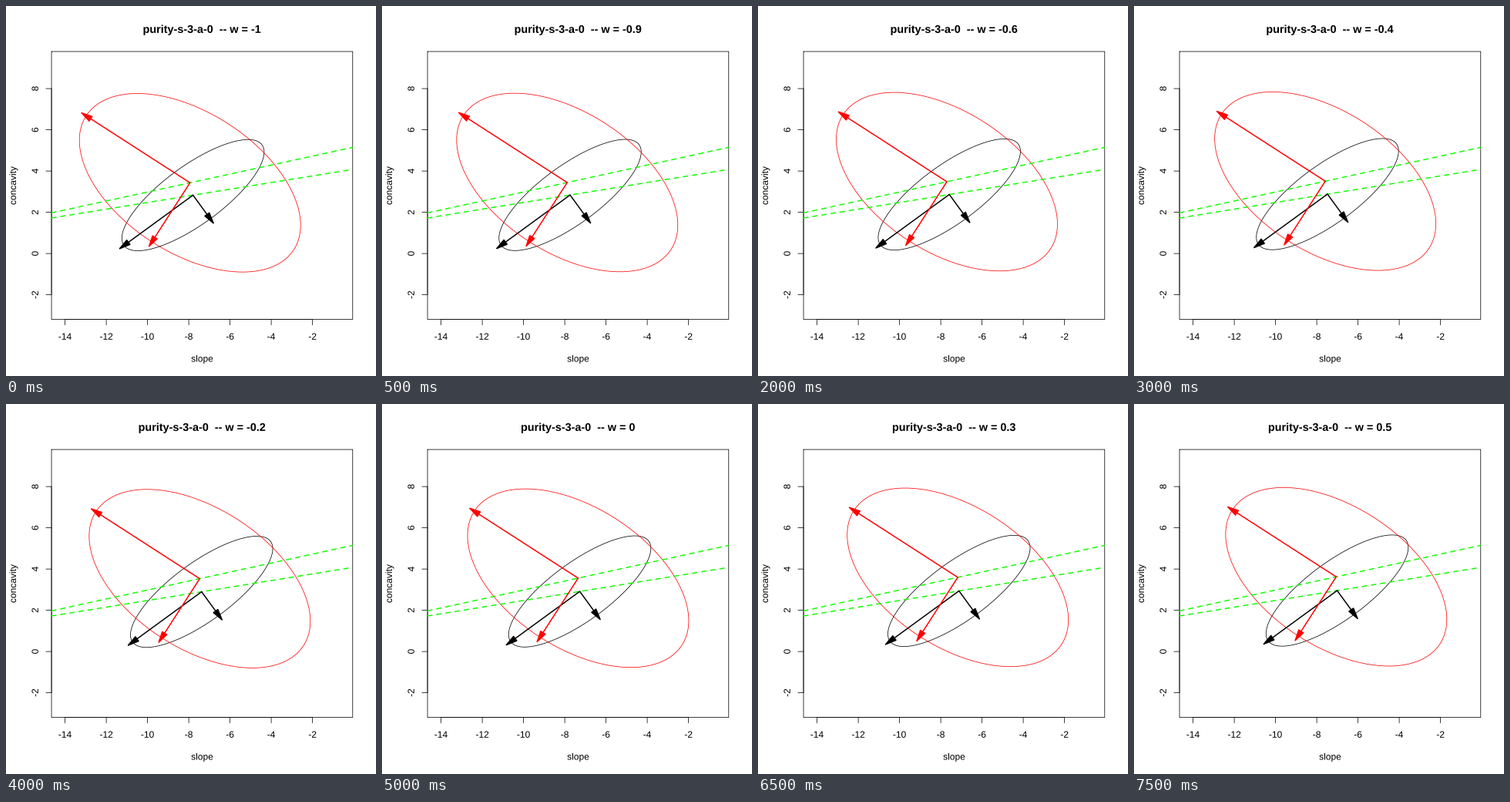
A matplotlib script that plays this animation: 480 px wide and 480 px high, repeating every 8 s.

```python
import numpy as np
import matplotlib.pyplot as plt
from matplotlib.animation import FuncAnimation
from matplotlib.patches import PathPatch, Polygon
from matplotlib.textpath import TextPath
from matplotlib.transforms import Affine2D

SIZE, DPI = 480, 72          # one point equals one pixel
STEPS, INTERVAL = 16, 500
LEFT, RIGHT, TOP, BOTTOM = 59.04, 449.76, 59.04, 406.56
UNIT, TICK = 26.75, 7.2
THIN, THICK = 0.75, 1.5
HEAD_LENGTH, HEAD_WIDTH = 14.1, 7.05

fig = plt.figure(figsize=(SIZE / DPI, SIZE / DPI), dpi=DPI, facecolor="white")
ax = fig.add_axes([0, 0, 1, 1])
ax.set_xlim(0, SIZE)
ax.set_ylim(SIZE, 0)
ax.axis("off")


def line(xs, ys, color="black", lw=THIN, **kw):
    kw = {"solid_capstyle": "round", "solid_joinstyle": "round", **kw}
    return ax.plot(xs, ys, color=color, lw=lw, snap=False, **kw)[0]


def text_shape(text, x, y, size=12, turn=0, weight="normal"):
    """Outline of a line of text, centred on x (or y if turned)."""
    font = {"family": "Liberation Sans", "weight": weight}
    path = TextPath((0, 0), text, size=size, prop=font)
    box = path.get_extents()
    place = (Affine2D().translate(-(box.x0 + box.x1) / 2, 0).scale(1, -1)
             .rotate_deg(-turn).translate(x, y))
    return place.transform_path(path)


def label(text, x, y, **kw):
    return ax.add_patch(PathPatch(text_shape(text, x, y, **kw), fc="black",
                                  lw=0, snap=False))


def draw_axes():
    line([LEFT, RIGHT, RIGHT, LEFT, LEFT], [TOP, TOP, BOTTOM, BOTTOM, TOP])
    xs = {s: 76.6 + UNIT * (s + 14) for s in range(-14, 0, 2)}
    ys = {c: 321.1 - UNIT * c for c in range(-2, 10, 2)}
    line([xs[-14], xs[-2]], [BOTTOM, BOTTOM])
    line([LEFT, LEFT], [ys[-2], ys[8]])
    for s, x in xs.items():
        line([x, x], [BOTTOM, BOTTOM + TICK])
        label(str(s), x, 432.8)
    for c, y in ys.items():
        line([LEFT - TICK, LEFT], [y, y])
        label(str(c), 41.8, y, turn=90)
    label("slope", 254.4, 461.5)
    label("concavity", 13.0, 232.8, turn=90)


class Arrow:
    """Shaft with a filled triangle centred on its end."""

    def __init__(self, vec, color):
        self.vec = vec
        u = vec / np.hypot(*vec)
        side = np.array([-u[1], u[0]]) * HEAD_WIDTH / 2
        tip = u * HEAD_LENGTH / 2
        self.corners = np.array([tip, side - tip, -side - tip])
        self.shaft = line([], [], color, THICK, zorder=5)
        self.head = ax.add_patch(Polygon(self.corners, closed=True, fc=color,
                                         ec=color, lw=THICK, snap=False,
                                         joinstyle="round", zorder=5))

    def move(self, c):
        end = c + self.vec
        self.shaft.set_data([c[0], end[0]], [c[1], end[1]])
        self.head.set_xy(self.corners + end)


class Spread:
    """Ellipse with its two axis arrows, sliding along a dashed line."""

    def __init__(self, color, x0, speed, y_left, y_right, long, short, angle):
        self.x0, self.speed, self.y_left = x0, speed, y_left
        self.slope = (y_right - y_left) / (RIGHT - LEFT)
        a = np.radians(angle)
        major = long * np.array([np.cos(a), np.sin(a)])
        minor = short * np.array([-np.sin(a), np.cos(a)])
        minor *= np.sign(minor[1])      # both short arrows point down
        t = np.linspace(0, 2 * np.pi, 101)
        self.ring = np.outer(np.cos(t), major) + np.outer(np.sin(t), minor)
        line([LEFT, RIGHT], [y_left, y_right], "#10ff00", THICK, zorder=4,
             dashes=(4, 4), dash_capstyle="round")
        self.curve = line([], [], color, zorder=3)
        self.arrows = [Arrow(major, color), Arrow(minor, color)]

    def move(self, i):
        x = self.x0 + self.speed * i
        c = np.array([x, self.y_left + self.slope * (x - LEFT)])
        self.curve.set_data(*(self.ring + c).T)
        for arrow in self.arrows:
            arrow.move(c)


draw_axes()
title = label("w", 254.4, 34.9)
spreads = [
    Spread("black", 242.6, 1.395, 275.0, 212.0, 110.8, 38.0, 180 - 36.1),
    Spread("red", 238.7, 1.575, 268.4, 183.4, 160.3, 91.2, 180 + 32.8),
]


def update(i):
    text = f"purity-s-3-a-0  -- w = {(i - 10) / 10:g}"
    title.set_path(text_shape(text, 254.4, 34.9, size=14.4, weight="bold"))
    for s in spreads:
        s.move(i)
    return []


anim = FuncAnimation(fig, update, frames=STEPS, interval=INTERVAL,
                     init_func=lambda: update(0), repeat=True, repeat_delay=0,
                     blit=False)
plt.show()
```
